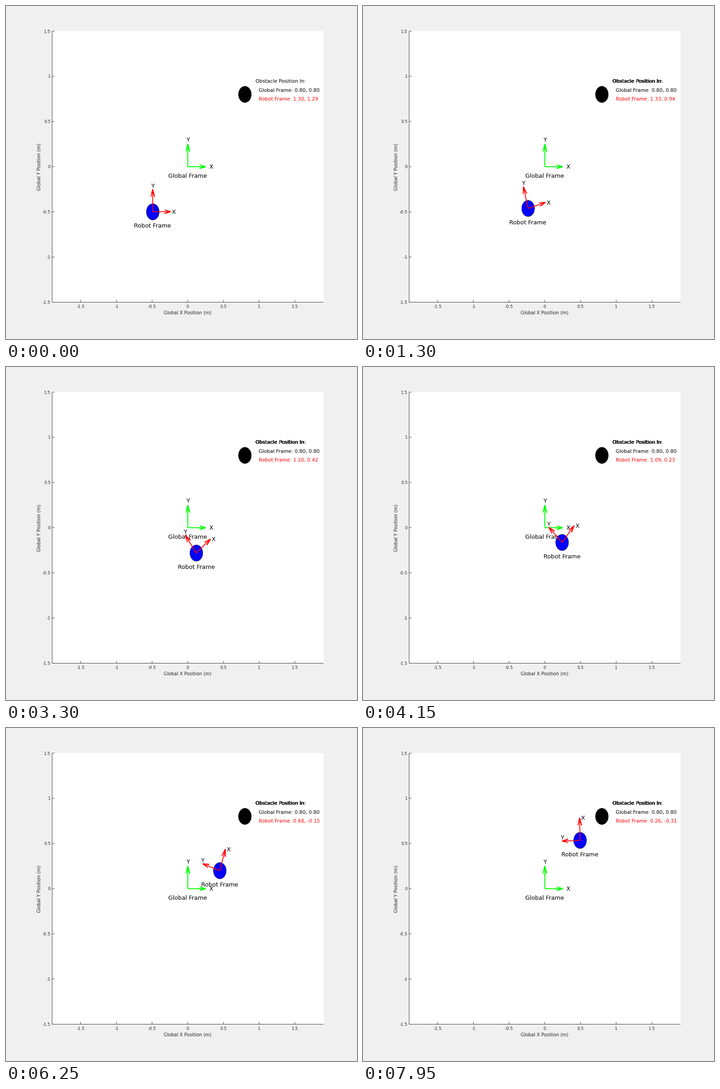
A matplotlib script that plays this animation: 768 by 729 pixels, repeating every 8000 ms.

```python
import numpy as np
import matplotlib.pyplot as plt
from matplotlib.animation import FuncAnimation
from matplotlib.patches import Ellipse, Rectangle

W, H, DPI = 768, 729, 96
PT = 72 / DPI                       # points per pixel
CX, CY, SX, SY = 397.75, 351.75, 156.2, 197.8
FRAMES, INTERVAL, STEP = 160, 50, 0.01
OBSTACLE = np.array([0.8, 0.8])
RADIUS, ARROW = 0.09, 0.25
TICK, LABEL, NOTE, NAME = 9.1, 10.05, 10.75, 12.78
GREY = (0.15, 0.15, 0.15)
TITLE_LAYERS = 10

plt.rcParams["font.family"] = "DejaVu Sans"
fig = plt.figure(figsize=(W / DPI, H / DPI), dpi=DPI, facecolor="#f0f0f0")
ax = fig.add_axes([0, 0, 1, 1])
ax.set_xlim(0, W)
ax.set_ylim(H, 0)
ax.axis("off")


def px(x, y):
    return CX + SX * x, CY - SY * y


def text(x, y, s, size, color="black", ha="center", z=5, **kw):
    """Place text so that its capitals are centred on y."""
    return ax.text(x, y + 0.355 * size, s, fontsize=size * PT, color=color,
                   ha=ha, va="baseline", zorder=z, **kw)


def line(xs, ys, color, width, z):
    return ax.plot(xs, ys, color=color, lw=width * PT, zorder=z, snap=False,
                   solid_capstyle="butt", solid_joinstyle="bevel")[0]


def disc(x, y, color, z):
    e = Ellipse(px(x, y), 2 * RADIUS * SX, 2 * RADIUS * SY, facecolor=color,
                edgecolor="black", lw=0.6 * PT, zorder=z)
    return ax.add_patch(e)


def arrow_points(x, y, angle):
    """Shaft followed by an open head, as one polyline."""
    tail = np.array(px(x, y))
    tip = np.array(px(x + ARROW * np.cos(angle), y + ARROW * np.sin(angle)))
    d = tip - tail
    side = np.array([-d[1], d[0]]) / np.hypot(*d) * 3.9
    neck = tip - 0.33 * d
    return np.array([tail, tip, neck + side, tip, neck - side]).T


def draw_axes():
    left, top = px(-1.9, 1.5)
    right, bottom = px(1.9, -1.5)
    ax.add_patch(Rectangle((left, top), right - left, bottom - top,
                           facecolor="white", edgecolor="none", zorder=0))
    line([left, left], [top, bottom], GREY, 0.9, 1)
    line([left, right], [bottom, bottom], GREY, 0.9, 1)
    for v in np.arange(-1.5, 1.6, 0.5):
        x, y = px(v, v)
        line([x, x], [bottom, bottom - 5], GREY, 0.9, 1)
        line([left, left + 5], [y, y], GREY, 0.9, 1)
        text(x, 658.2, f"{v:g}", TICK, GREY)
        text(97.5, y + 0.3, f"{v:g}", TICK, GREY, ha="right")
    text(CX - 0.4, 671, "Global X Position (m)", LABEL, GREY)
    ax.text(71.5 + 0.355 * LABEL, CY, "Global Y Position (m)", rotation=90,
            rotation_mode="anchor", fontsize=LABEL * PT, color=GREY,
            ha="center", va="baseline")


def draw_global():
    for angle in (0, np.pi / 2):
        line(*arrow_points(0, 0, angle), "lime", 2, 2)
    text(*px(0.328, 0), "X", NAME, z=3)
    text(*px(0, 0.301), "Y", NAME, z=3)
    text(*px(0, -0.1), "Global Frame", NAME, z=3)


def pose(k):
    """Robot position and heading after k turning steps."""
    headings = STEP * np.arange(1, k + 1)
    return (-0.5 + STEP * np.cos(headings).sum(),
            -0.5 + STEP * np.sin(headings).sum(), STEP * k)


def move(artist, x, y):
    artist.set_position((x, y + 0.355 * NAME))


draw_axes()
draw_global()
disc(*OBSTACLE, "black", 2)

note_x = px(1.0, 0)[0] - 1
titles = [text(px(0.95, 0)[0] - 0.5, 164.2, "Obstacle Position In:", NOTE,
               ha="left", z=8) for _ in range(TITLE_LAYERS)]
text(note_x, 183.8, "Global Frame: 0.80, 0.80", NOTE, ha="left", z=8)
readout = text(note_x, 203.6, "", NOTE, "red", ha="left", z=8)

body = disc(0, 0, "blue", 4)
axis_x = line([], [], "red", 1.8, 6)
axis_y = line([], [], "red", 1.8, 6)
name_x = text(0, 0, "X", NAME, z=7)
name_y = text(0, 0, "Y", NAME, z=7)
name = text(0, 0, "Robot Frame", NAME, z=7)


def update(i):
    x, y, th = pose(i + 1)
    c, s = np.cos(th), np.sin(th)
    dx, dy = OBSTACLE - (x, y)

    body.set_center(px(x, y))
    axis_x.set_data(*arrow_points(x, y, th))
    axis_y.set_data(*arrow_points(x, y, th + np.pi / 2))
    move(name_x, *px(x + ARROW * c + 0.046, y + ARROW * s))
    move(name_y, *px(x - ARROW * s - 0.002, y + ARROW * c + 0.041))
    move(name, *px(x - 0.003, y - 0.152))
    readout.set_text(f"Robot Frame: {c * dx + s * dy:.2f}, {c * dy - s * dx:.2f}")
    # The heading is overprinted once per step, so its edges thicken.
    for n, t in enumerate(titles):
        t.set_visible(n <= i)
    return [body, axis_x, axis_y, name_x, name_y, name, readout, *titles]


anim = FuncAnimation(fig, update, frames=FRAMES, interval=INTERVAL,
                     repeat=True, repeat_delay=0, blit=False)
plt.show()
```
